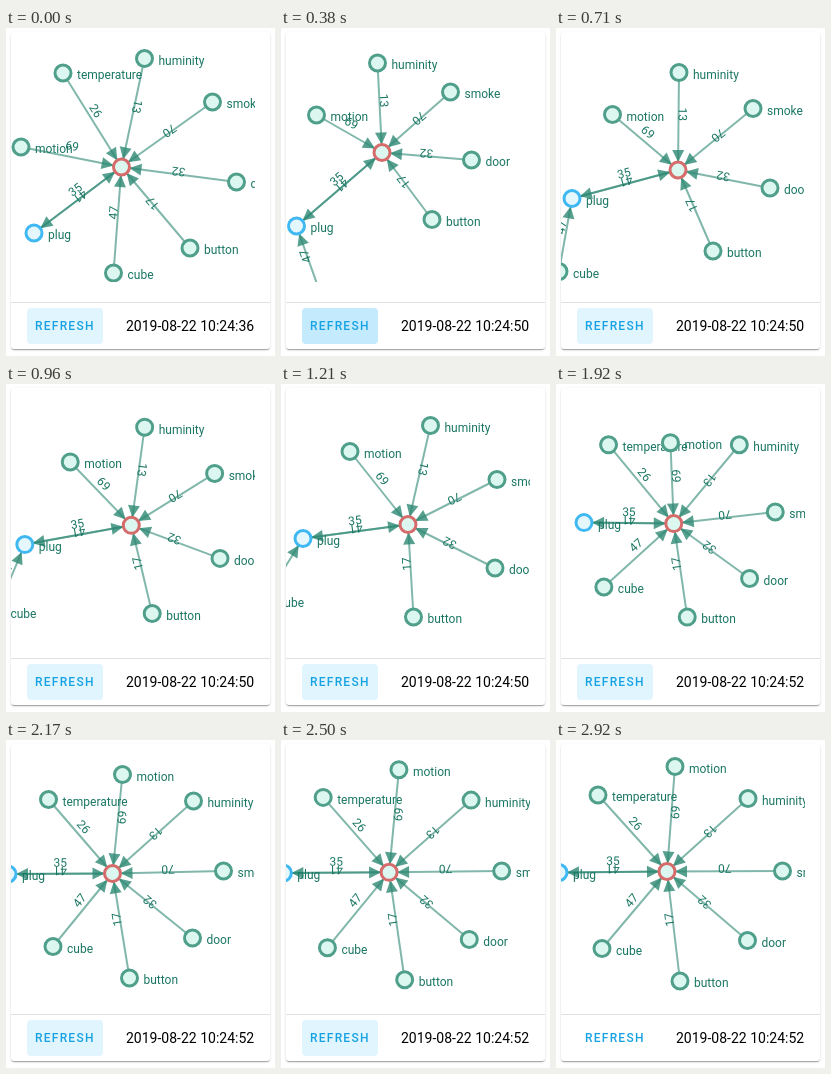
An HTML page for the animation above (2.96 s loop, 269 by 328 pixels).

```html
<!DOCTYPE html>
<html lang="en">
<head>
<meta charset="utf-8">
<title>Device graph</title>
<style>
  html, body { margin: 0; width: 100%; height: 100%; overflow: hidden; background: #fff; }
  .card {
    position: absolute; left: 5px; top: 4px; width: 259px; height: 317px;
    border-radius: 3px; background: #fff;
    box-shadow: 0 2px 1px -1px rgba(0,0,0,.2), 0 1px 1px rgba(0,0,0,.14), 0 1px 3px rgba(0,0,0,.12);
  }
  svg { position: absolute; left: 0; top: 0; width: 269px; height: 328px; }
  text { font-family: Roboto, sans-serif; font-size: 12px; fill: #1a7663; }
  .link { stroke: #2d8873; stroke-width: 2; stroke-opacity: .6; }
  .arrow { fill: #2d8873; fill-opacity: .8; }
  .value { text-anchor: middle; }
  .node { stroke: #4f9f8b; stroke-width: 3; fill: #dcf7ef; }
  .node.hub { stroke: #d66b6b; }
  .node.active { stroke: #40b9f2; fill: #e4f7fd; }
  #label { font-weight: 500; letter-spacing: 1.25px; fill: #17a3e3; }
  #date { font-size: 14px; fill: #000; }
</style>
</head>
<body>
<div class="card"></div>
<svg viewBox="0 0 269 328">
  <clipPath id="view"><rect x="5" y="4" width="244" height="250"/></clipPath>
  <g id="graph" clip-path="url(#view)"></g>
  <path d="M5 274.5H264" stroke="#e0e0e0"/>
  <rect id="button" x="21" y="280" width="76" height="36" rx="4" fill="#03a9f4"/>
  <text id="label" x="29" y="302">REFRESH</text>
  <text id="date" x="120" y="303"></text>
</svg>
<script>
const LOOP = 2960, FIRST = 210, STEP = 2710 / 65;
const REFRESH = [200, 1450];           // moments the layout restarts
const HOVER_END = 2630;
const TIMES = [200, 380, 710, 1210, 1450, 1670, 2170, 2920];

// x, y of each device at the main moments of the layout
const POSES = {
  hub:         [115.5,139, 101,124.5, 122,142, 127,140.5, 129,145, 106.5,133.5, 111,131.5],
  temperature: [57,45, 25,29, 25,29, 25,29, 62.5,61.5, 42.5,59.5, 42,55],
  huminity:    [138.5,30.5, 96.5,35, 123,44.5, 149.5,41.5, 175.5,60, 187.5,61, 192,58.5],
  smoke:       [206.5,74, 169.5,64, 197,80.5, 216,95.5, 221,120.5, 217.5,131, 226.5,131],
  door:        [230.5,154, 190.5,132, 214,160, 214,184, 205.5,190, 186.5,198, 191.5,200.5],
  button:      [184,220, 151,191.5, 157,223, 132.5,233, 139,229, 123.5,238, 124,241],
  cube:        [107.5,245, 41,270, 3,243.5, -17,216.5, 48.5,200, 47,206.5, 46,208.5],
  plug:        [28,205, 15.5,198, 16,170.5, 22,154.5, 54,146, 2,134, 3,132.5],
  motion:      [15,119, 35.5,87, 56.5,86.5, 69,67.5, 110,80.5, 116.5,34.5, 119,26.5]
};
const LINKS = [
  ['temperature', 'hub', 26], ['huminity', 'hub', 13], ['smoke', 'hub', 70],
  ['door', 'hub', 32], ['button', 'hub', 17], ['cube', 'hub', 47],
  ['motion', 'hub', 69], ['plug', 'hub', 35], ['hub', 'plug', 41]
];

const $ = id => document.getElementById(id);
const clamp = v => Math.max(0, Math.min(1, v));
const graph = $('graph');

function add(tag, cls, content = '') {
  const el = document.createElementNS('http://www.w3.org/2000/svg', tag);
  el.setAttribute('class', cls);
  el.textContent = content;
  return graph.appendChild(el);
}
function set(el, attrs) {
  for (const k in attrs) el.setAttribute(k, attrs[k]);
}
const show = (els, on) => els.forEach(el => el.style.display = on ? '' : 'none');

// Smooth track through the values; motion starts abruptly at each refresh
function track(values) {
  const v = values.slice();
  v.splice(4, 0, v[3] + .15 * (v[3] - v[2]));
  const last = v.length - 1;
  const secant = v.slice(1).map((y, i) => (y - v[i]) / (TIMES[i + 1] - TIMES[i]));
  const slope = (i, leaving) => {
    if (i === last) return secant[i - 1] * .5;
    if (REFRESH.includes(TIMES[i])) return leaving ? secant[i] : secant[i - 1] * .3;
    const a = secant[i - 1], b = secant[i];
    return a * b > 0 ? 2 * a * b / (a + b) : 0;
  };
  return t => {
    if (t <= TIMES[0]) return v[0];
    let i = 0;
    while (i < last - 1 && t >= TIMES[i + 1]) i++;
    const h = TIMES[i + 1] - TIMES[i], u = clamp((t - TIMES[i]) / h), w = 1 - u;
    return v[i] * w * w * (1 + 2 * u) + v[i + 1] * u * u * (3 - 2 * u)
      + h * u * w * (slope(i, true) * w - slope(i + 1, false) * u);
  };
}

const links = LINKS.map(([from, to, value]) => ({
  from, to, line: add('line', 'link'), arrow: add('path', 'arrow'), value
}));
links.forEach(l => {
  set(l.arrow, { d: 'M-20-6L-8 0L-20 6Z' });
  l.text = add('text', 'value', l.value);
});
const nodes = Object.entries(POSES).map(([name, p]) => {
  const cls = name === 'hub' ? 'node hub' : name === 'plug' ? 'node active' : 'node';
  const circle = add('circle', cls);
  set(circle, { r: 8 });
  return {
    name, circle, text: add('text', 'name', name === 'hub' ? '' : name),
    x: track(p.filter((_, i) => i % 2 === 0)),
    y: track(p.filter((_, i) => i % 2 === 1))
  };
});

function drawLink(l, a, b) {
  const angle = Math.atan2(b.y - a.y, b.x - a.x) * 180 / Math.PI;
  set(l.line, { x1: a.x, y1: a.y, x2: b.x, y2: b.y });
  set(l.arrow, { transform: `translate(${b.x} ${b.y}) rotate(${angle})` });
  set(l.text, { transform: `translate(${(a.x + b.x) / 2} ${(a.y + b.y) / 2 - 7}) rotate(${angle})` });
}

function ripple(t) {
  return Math.max(...REFRESH.map(s => Math.min(clamp((t - s) / 75), clamp((s + 350 - t) / 130))));
}

function draw(t) {
  const phase = REFRESH.filter(s => t >= s).length;
  const at = {};
  for (const n of nodes) {
    const p = at[n.name] = { x: n.x(t), y: n.y(t) };
    set(n.circle, { cx: p.x, cy: p.y });
    set(n.text, { x: p.x + 14, y: p.y + 6.4 });
    show([n.circle, n.text], n.name !== 'temperature' || phase !== 1);
  }
  for (const l of links) {
    const to = l.from === 'cube' && phase === 1 ? 'plug' : l.to;
    drawLink(l, at[l.from], at[to]);
    show([l.line, l.arrow, l.text], l.from !== 'temperature' || phase !== 1);
  }
  const hover = .12 * clamp((HOVER_END + 60 - t) / 60);
  set($('button'), { 'fill-opacity': hover + .11 * ripple(t) });
  $('date').textContent = '2019-08-22 10:24:' + [36, 50, 52][phase];
}

// The picture advances in steps of about 42 ms after a first pause
function frame(now) {
  const t = now % LOOP;
  const step = Math.floor((t - FIRST + 4) / STEP);
  draw(t < FIRST ? 0 : Math.round((FIRST + step * STEP) / 10) * 10);
  requestAnimationFrame(frame);
}
draw(0);
requestAnimationFrame(frame);
</script>
</body>
</html>
```
